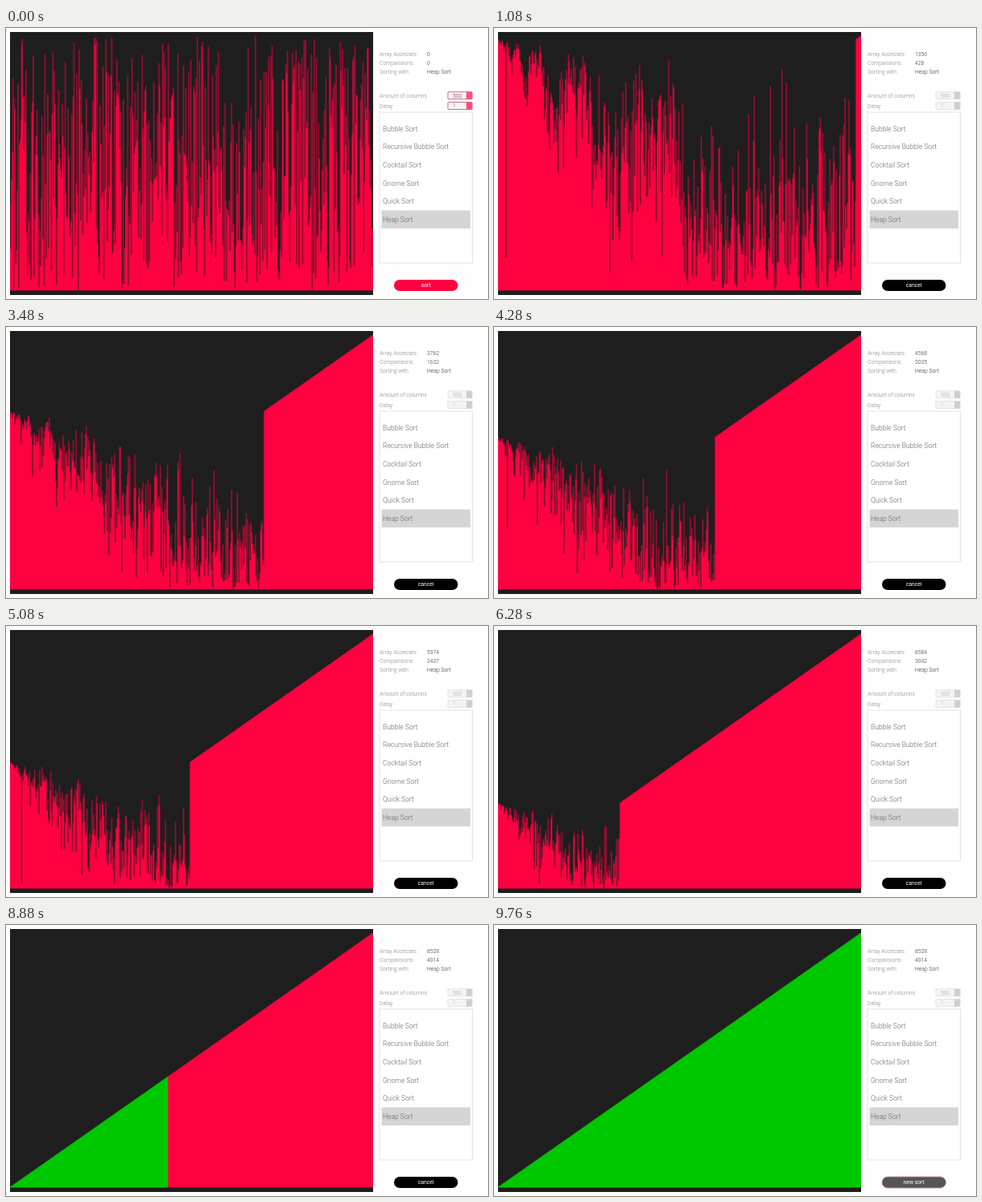
Animation, 600 px wide and 338 px high, one loop 9840 ms. Source, as an HTML page with a canvas:

```html
<!DOCTYPE html>
<html lang="en">
<head>
<meta charset="utf-8">
<title>Heap Sort</title>
<style>
  html, body { margin: 0; width: 600px; height: 338px; overflow: hidden; background: #fefefe; }
  canvas, svg { position: absolute; left: 0; top: 0; }
  text { font: 300 6.8px Roboto, sans-serif; fill: #858585; }
  .value { fill: #333; }
  .item { font-size: 8.56px; fill: #666; }
  #label { font-weight: 400; fill: #fff; text-anchor: middle; }
</style>
</head>
<body>
<canvas id="stage" width="600" height="338"></canvas>
<svg id="panel" width="600" height="338">
  <text x="465" y="35">Array Accesses:</text>
  <text x="465" y="46">Comparisions:</text>
  <text x="465" y="57">Sorting with:</text>
  <text class="value" id="accesses" x="524" y="35">0</text>
  <text class="value" id="comparisons" x="524" y="46">0</text>
  <text class="value" x="524" y="57">Heap Sort</text>
  <text x="465" y="86.5">Amount of columns</text>
  <text x="465" y="99.5">Delay</text>
  <rect x="465" y="105" width="115.5" height="188" fill="#fff" stroke="#ddd" stroke-width=".8"/>
  <rect x="467.5" y="227.5" width="110.5" height="22.5" fill="#d5d5d5"/>
  <g id="items"></g>
  <g id="enabled"></g>
  <g id="disabled"></g>
  <rect id="button" x="483" y="314" width="79.5" height="14" rx="7"/>
  <text id="label" x="522.7" y="323.3">sort</text>
</svg>
<script>
const LOOP = 9840, STEP = 40, COLUMNS = 500, SWEEP_START = 8220, DONE = 9740;
const RED = '#ff0040', GREEN = '#00c800', DARK = '#1e1e1e';
const $ = id => document.getElementById(id);

// Time, array accesses, comparisons
const progress = [
  [232, 500, 0], [1080, 1356, 428], [2080, 2356, 928], [3480, 3762, 1632],
  [5080, 5374, 2437], [7600, 7914, 3707], [8210, 8528, 4014]
];

function swap(list, i, j) {
  [list[i], list[j]] = [list[j], list[i]];
}

function shuffled() {
  let seed = 20;
  const random = () => (seed = (seed * 1664525 + 1013904223) % 4294967296) / 4294967296;
  const list = Array.from({ length: COLUMNS }, (_, i) => i + 1);
  for (let i = COLUMNS - 1; i > 0; i--) swap(list, i, Math.floor(random() * (i + 1)));
  return list;
}

function heapSortSwaps(list) {
  const swaps = [];
  const move = (i, j) => { swap(list, i, j); swaps.push([i, j]); };
  function sift(size, root) {
    for (;;) {
      let top = root;
      for (const child of [2 * root + 1, 2 * root + 2])
        if (child < size && list[child] > list[top]) top = child;
      if (top === root) return;
      move(root, top);
      root = top;
    }
  }
  for (let i = COLUMNS / 2 - 1; i >= 0; i--) sift(COLUMNS, i);
  for (let end = COLUMNS - 1; end > 0; end--) {
    move(0, end);
    sift(end, 0);
  }
  return swaps;
}

const start = shuffled();
const swaps = heapSortSwaps([...start]);

function countersAt(t) {
  if (t < progress[0][0]) return [0, 0];
  const next = progress.findIndex(p => p[0] > t);
  if (next < 0) return progress[progress.length - 1].slice(1);
  const a = progress[next - 1], b = progress[next];
  const k = (t - a[0]) / (b[0] - a[0]);
  const mix = n => a[n] + (b[n] - a[n]) * k;
  return [2 * Math.round(mix(1) / 2), Math.round(mix(2))];
}

// Bars are drawn one pixel per column, then scaled to the panel width
const bars = document.createElement('canvas');
bars.width = COLUMNS;
bars.height = 328;
const pen = bars.getContext('2d');
const stage = $('stage').getContext('2d');

function drawBars(steps, green) {
  const list = [...start];
  for (let n = 0; n < steps; n++) swap(list, ...swaps[n]);
  pen.fillStyle = DARK;
  pen.fillRect(0, 0, COLUMNS, 328);
  list.forEach((value, i) => {
    const height = value * 317.3 / COLUMNS;
    pen.fillStyle = i < green ? GREEN : RED;
    pen.fillRect(i, 322.4 - height, 1, height);
  });
  stage.drawImage(bars, 5, 5, 452, 328);
  // A half-strength copy one column over softens the thin bars
  stage.globalAlpha = 0.5;
  stage.drawImage(bars, 1, 0, COLUMNS - 1, 328, 5, 5, 452 * (1 - 1 / COLUMNS), 328);
  stage.globalAlpha = 1;
}

function spinner(y, value, border, fill, arrow, ink) {
  return `<rect x="550" y="${y}" width="30" height="9" rx="1" fill="${fill}" stroke="${border}" stroke-width=".8"/>
    <rect x="573" y="${y}" width="7.4" height="9" fill="${arrow}"/>
    <text x="556" y="${y + 6.9}" style="fill:${ink}">${value}</text>`;
}
const spinners = (...colors) => spinner(79.7, 500, ...colors) + spinner(92.5, 1, ...colors);
$('enabled').innerHTML = spinners('#b8506c', '#f6f4f4', '#f5537c', '#b01040');
$('disabled').innerHTML = spinners('#ddd', '#f4f4f4', '#d0d0d0', '#aaa');
$('items').innerHTML = ['Bubble', 'Recursive Bubble', 'Cocktail', 'Gnome', 'Quick', 'Heap']
  .map((name, i) => `<text class="item" x="469" y="${128.7 + i * 22.62}">${name} Sort</text>`).join('');

function draw(t) {
  const [accesses, comparisons] = countersAt(t);
  const total = progress[progress.length - 1][2];
  drawBars(Math.round(comparisons / total * swaps.length), (t - SWEEP_START) * 0.3295);
  $('accesses').textContent = accesses;
  $('comparisons').textContent = comparisons;

  const busy = Math.min(1, Math.max(0, (t - 40) / 160));
  const done = t >= DONE;
  $('enabled').style.opacity = 1 - busy;
  $('disabled').style.opacity = busy;
  $('button').setAttribute('fill', done ? '#555' : `rgb(${255 * (1 - busy)}, 0, ${64 * (1 - busy)})`);
  $('button').setAttribute('stroke', done ? '#c890a0' : 'none');
  $('label').textContent = done ? 'new sort' : busy < 0.5 ? 'sort' : 'cancel';
}

function tick() {
  const t = performance.now() % LOOP;
  draw(Math.floor(t / STEP) * STEP);
  requestAnimationFrame(tick);
}
tick();
</script>
</body>
</html>
```
